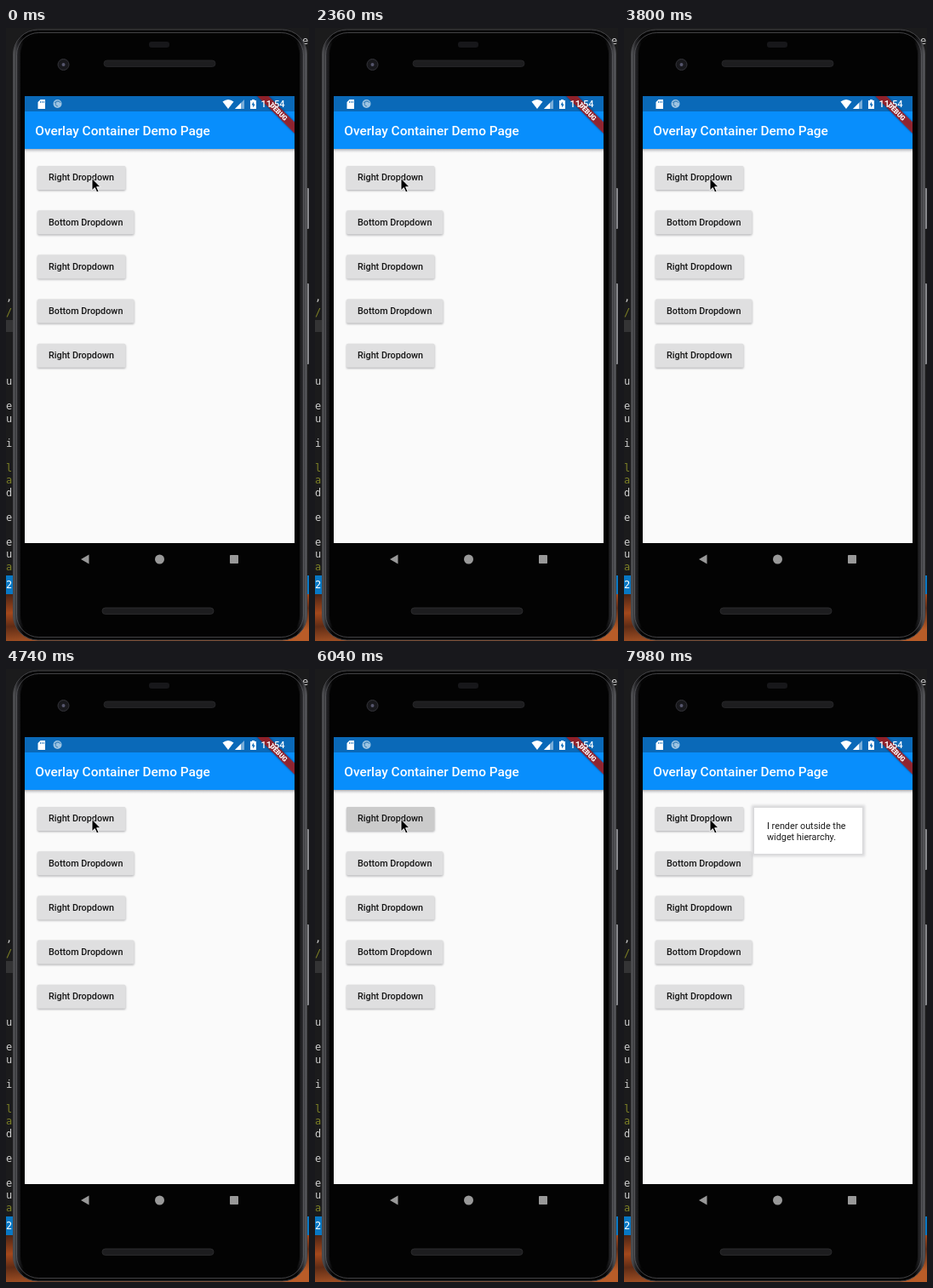
Recreate the animation shown at these times as an HTML page. Size 356x720 px, loop 8 s.

```html
<!DOCTYPE html>
<html lang="en">
<head>
<meta charset="utf-8">
<title>Overlay Container Demo</title>
<style>
html, body { margin: 0; width: 100%; height: 100%; overflow: hidden; background: #1b1b1c; }
svg { display: block; width: 100vw; height: 100vh; }
text { font-family: Roboto, "Noto Sans", sans-serif; }
.code text { font: 12px "DejaVu Sans Mono", monospace; fill: #cfcfcf; }
.code .dim { fill: #7d8026; }
.label { font-size: 10.8px; font-weight: 500; fill: #161616; }
.body { font-size: 10.8px; fill: #1c1c1c; }
.press { animation: press 8s linear infinite; }
.popup { animation: popup 8s step-end infinite; }
@keyframes press {
  0%, 73.25% { opacity: 0; }
  75.25%, 77% { opacity: 1; }
  79.5%, 100% { opacity: 0; }
}
@keyframes popup {
  0% { opacity: 0; }
  77%, 100% { opacity: 1; }
}
</style>
</head>
<body>
<svg viewBox="0 0 356 720" xmlns="http://www.w3.org/2000/svg">
  <defs>
    <linearGradient id="rim" x2="1" y2="0">
      <stop offset="0" stop-color="#5a5b5e"/>
      <stop offset=".015" stop-color="#242427"/>
      <stop offset=".035" stop-color="#040404"/>
      <stop offset=".965" stop-color="#040404"/>
      <stop offset=".985" stop-color="#29292c"/>
      <stop offset="1" stop-color="#626367"/>
    </linearGradient>
    <linearGradient id="wood" x2=".4" y2="1">
      <stop offset="0" stop-color="#4a2415"/>
      <stop offset=".35" stop-color="#a3481c"/>
      <stop offset=".6" stop-color="#5f2c16"/>
      <stop offset="1" stop-color="#b85c28"/>
    </linearGradient>
    <linearGradient id="barShadow" x2="0" y2="1">
      <stop stop-color="#8d8d92" stop-opacity=".7"/>
      <stop offset="1" stop-color="#d8d8dc" stop-opacity="0"/>
    </linearGradient>
    <filter id="soft" x="-20%" y="-40%" width="140%" height="180%"><feGaussianBlur stdDeviation="1"/></filter>
    <filter id="glow" x="-20%" y="-30%" width="140%" height="160%"><feGaussianBlur stdDeviation="1.6"/></filter>
    <clipPath id="screen"><rect x="22" y="80" width="317" height="525"/></clipPath>
  </defs>

  <!-- desktop behind the device -->
  <rect width="356" height="720" fill="#1b1b1c"/>
  <rect y="343" width="356" height="14" fill="#343435"/>
  <rect y="643" width="356" height="22" fill="#0878c4"/>
  <rect y="665" width="356" height="55" fill="url(#wood)"/>
  <g class="code" id="code">
    <text x="0" y="658" style="fill:#fff">2</text>
    <text x="348" y="19">e</text>
  </g>

  <!-- device -->
  <g fill="#85868a">
    <rect x="351" y="188" width="5" height="48" rx="1"/>
    <rect x="351" y="300" width="5" height="95" rx="1"/>
  </g>
  <rect x="8.500" y="2" width="345" height="717" rx="29" fill="url(#rim)" stroke="#464649"/>
  <rect x="12.500" y="5.500" width="337" height="710" rx="26" fill="none" stroke="#6b6c70" stroke-opacity=".6"/>
  <rect x="17" y="9" width="328" height="703" rx="22" fill="#030303"/>
  <rect x="168" y="16" width="24" height="7" rx="3" fill="#17171a"/>
  <rect x="115" y="38" width="131" height="7.500" rx="3.700" fill="#1d1d1f" stroke="#2a2a2d" stroke-width=".8"/>
  <rect x="113" y="681" width="131" height="7.500" rx="3.700" fill="#1d1d1f" stroke="#303033" stroke-width=".8"/>
  <circle cx="67.500" cy="43" r="6.500" fill="#18181c" stroke="#333339"/>
  <circle cx="67.500" cy="43" r="2" fill="#56566c"/>

  <!-- app -->
  <g clip-path="url(#screen)">
    <rect x="22" y="80" width="317" height="525" fill="#fafafa"/>
    <rect x="22" y="142" width="317" height="5" fill="url(#barShadow)"/>
    <rect x="22" y="80" width="317" height="62" fill="#088efc"/>
    <rect x="22" y="80" width="317" height="18" fill="#0a69b8"/>
    <text x="34.300" y="126" font-size="15.400" font-weight="500" fill="#fff">Overlay Container Demo Page</text>
    <g id="buttons"></g>
    <g class="popup">
      <rect x="150" y="160" width="133" height="60" fill="#d2d2d4" filter="url(#glow)" opacity=".85"/>
      <rect x="153" y="163" width="127" height="54" fill="#fff"/>
      <text class="body" x="168" y="188">I render outside the</text>
      <text class="body" x="168" y="200.500">widget hierarchy.</text>
    </g>
    <g transform="translate(339 80) rotate(45)">
      <rect x="-32" y="21.600" width="64" height="9.300" fill="#000" opacity=".5" filter="url(#soft)"/>
      <rect x="-32" y="21.600" width="64" height="9.300" fill="#b71c1c" opacity=".78"/>
      <text y="29" font-size="7.900" font-weight="900" text-anchor="middle" fill="#fff">DEBUG</text>
    </g>
  </g>

  <!-- status bar icons -->
  <g fill="#fff">
    <path d="M40.500 84h5.500v11h-8.500v-8z"/>
    <path d="M40.500 86v2m2-2v2m2-2v2" stroke="#0a69b8" stroke-width=".8"/>
    <circle cx="60.500" cy="89" r="5" fill="#9cc3e2"/>
    <path d="M57 88a4 4 0 0 1 7 0a3 3 0 1 0-3 4" fill="none" stroke="#3f86bd"/>
    <path d="M254.500 86.500Q261 81.500 267.500 86.500L261 95z"/>
    <path d="M280 84v11h-11z" opacity=".45"/>
    <path d="M276 88v7h-7z"/>
    <path d="M289 84h3v1h2v10h-7v-10h2z"/>
    <path d="M291 86.500l-2.500 4h1.700v3l2.500-4h-1.700z" fill="#0a69b8"/>
    <text x="299.500" y="93.300" font-size="11" font-weight="500">11:54</text>
  </g>

  <!-- navigation -->
  <g fill="#999">
    <path d="M88 624l9.500-5.500v11z"/>
    <circle cx="180.500" cy="624" r="5.500"/>
    <rect x="263" y="619" width="10" height="10" rx=".8"/>
  </g>

  <path d="M101 176.500v14.200l3.300-3.100 2.400 5.300 2.300-1-2.400-5.200h4.500z" fill="#000" stroke="#fff" stroke-width=".9" stroke-linejoin="round"/>
</svg>
<script>
const NS = "http://www.w3.org/2000/svg";

function add(parent, tag, attrs, text = "") {
  const node = document.createElementNS(NS, tag);
  for (const key in attrs) node.setAttribute(key, attrs[key]);
  node.textContent = text;
  parent.append(node);
}

const buttons = document.getElementById("buttons");
for (let i = 0; i < 5; i++) {
  const side = i % 2 ? "Bottom" : "Right";
  const y = 162 + i * 52.2;
  const box = { x: 37, y, width: i % 2 ? 113.5 : 103.5, height: 28, rx: 1.6 };
  add(buttons, "rect", { ...box, y: y + 1.2, fill: "#8c8c90", filter: "url(#soft)", opacity: 0.65 });
  add(buttons, "rect", { ...box, fill: "#dfdfe0" });
  if (i === 0) add(buttons, "rect", { ...box, fill: "#cbcbcb", class: "press" });
  add(buttons, "text", { x: 50, y: y + 17.4, class: "label" }, `${side} Dropdown`);
}

const code = document.getElementById("code");
const fragments = [
  [",", 320], ["/", 338, 1], ["u", 419], ["e", 448], ["u", 463], ["i", 492],
  ["l", 521, 1], ["a", 535, 1], ["d", 550], ["e", 579], ["e", 608], ["u", 622], ["a", 637, 1]
];
for (const [glyph, y, dim] of fragments) {
  add(code, "text", { x: 0, y, class: dim ? "dim" : "" }, glyph);
}
</script>
</body>
</html>
```
